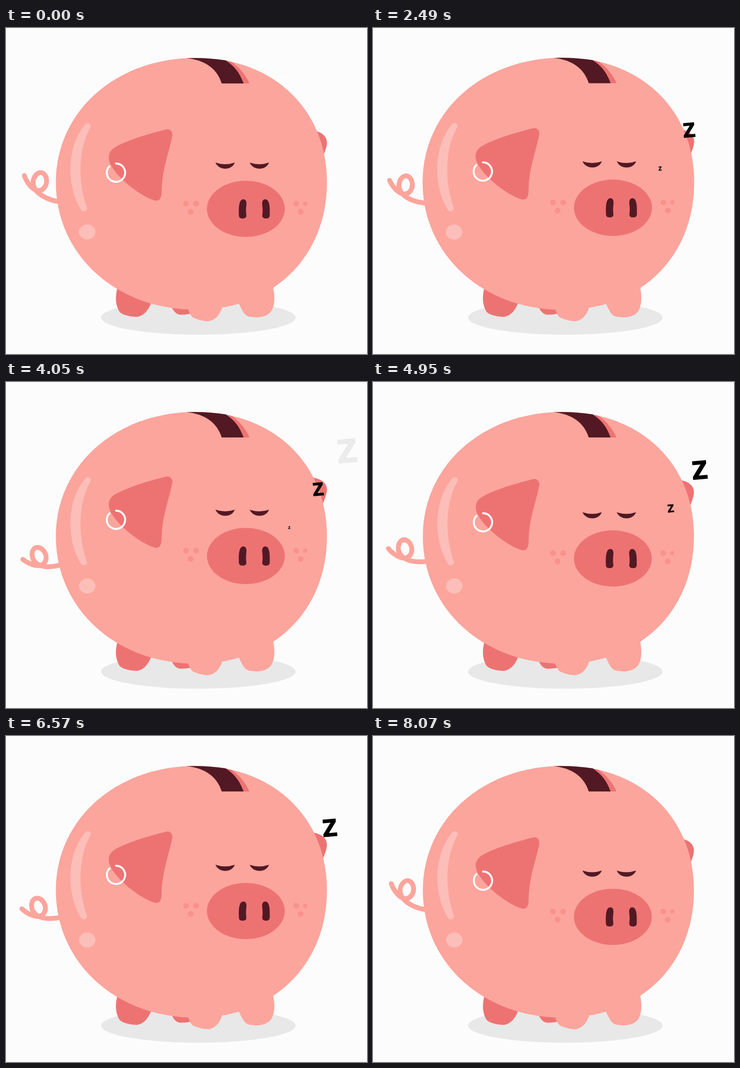
Write an HTML page that moves like this. It is 748 by 676 pixels and loops after 8.1 s.

```html
<!DOCTYPE html>
<html lang="en">
<head>
<meta charset="utf-8">
<title>Sleeping piggy bank</title>
<style>
  html, body { margin: 0; width: 100%; height: 100%; overflow: hidden; background: #fcfcfc; }
  svg { display: block; }
  .skin { fill: #fca59c; }
  .rose { fill: #ed7373; }
  .dark { fill: #521924; }
  .shine { fill: #fcbeb9; }
  .freckle { fill: #f9928c; }
  .line { fill: none; stroke-linecap: round; }
  .snore { font: 700 92px "Open Sans", "Noto Sans", sans-serif; text-anchor: middle; }
</style>
</head>
<body>
<svg width="748" height="676" viewBox="0 0 748 676">
  <ellipse cx="398.5" cy="600.5" rx="201.5" ry="35.5" fill="#e8e8e8"/>
  <g class="rose">
    <path d="M234 530C226 550 225 571 235 588C241 596 262 599 270 599C286 598 298 582 302 565V530Z"/>
    <path d="M338 570C346 584 350 593 360 594.5C370 595 380 593 390 591V570Z"/>
  </g>

  <g id="pig">
    <path id="tail" class="line" stroke="#fca59c" stroke-width="10"
      d="M38 306C42 318 54 337 67 337C79 337 85 325 84 315C83 304 76 299 70 300C60 302 54 316 57 326C60 342 85 358 116 361"/>
    <path class="rose head" d="M610 211C640 210 664 216 665 237C665 249 658 262 650 285Z"/>
    <path class="skin" d="M103.3 320C103.3 173 227 62 394 62C553 62 665 168 665 320C665 475 553 584 394 584C227 584 103.3 470 103.3 320Z"/>

    <path class="dark" d="M373 62.5C414 66 438 86 447 115H492.5C484 92 473 78 455 67Q415 61 373 62.5Z"/>
    <path class="rose" d="M455 67C473 78 484 92 492.5 115H504.5C497 98 485 83 468 70.5Z"/>
    <path class="shine" d="M165 199C170 195 178 199 175 206C150 250 148 315 167 371C170 378 162 383 156 378C124 327 125 245 165 199Z"/>
    <ellipse class="shine" cx="168.3" cy="423" rx="17" ry="15.7"/>

    <g class="head">
      <path class="rose" d="M331 210.5C340 208 346 215 344.5 224C338 258 324 290 322.5 335C323 354 318 362 303 356C275 345 240 318 222 292C208 272 210 256 228 246C258 230 295 220 331 210.5Z"/>
      <path class="line" stroke="#fff" stroke-width="4" d="M228 281A19 19 0 1 1 214.5 286.5"/>
      <g class="freckle">
        <circle cx="373" cy="364" r="6"/><circle cx="394" cy="364" r="6"/><circle cx="382.5" cy="381" r="6"/>
        <circle cx="601.5" cy="364" r="6"/><circle cx="620" cy="364" r="4.5"/><circle cx="610.5" cy="381" r="6"/>
      </g>
      <ellipse class="rose" cx="497" cy="375" rx="80.7" ry="58.3"/>
      <g class="dark">
        <path id="eye" d="M434 279Q454 286 474 279C468 296 441 296 434 279Z"/>
        <use href="#eye" x="71"/>
        <path id="nostril" d="M490 355.5C497 354 499 360 498 368C497 376 497 382 498 388C498.5 394 494 395 490 395C484 395 482 392 482.5 385C482 372 483 357 490 355.5Z"/>
        <use href="#nostril" transform="matrix(-1 0 0 1 1029 0)"/>
      </g>
    </g>
  </g>

  <g class="skin">
    <path d="M375 578C379 586 381 595 387 600C395 604 408 608 418 608C434 607 445 593 449 575V560H375Z"/>
    <path d="M481 568C487 580 491 591 498 596C505 600 514 600 520 600C531 599.5 542 597 549 588C557 576 558 556 553 536L500 545Z"/>
  </g>
  <g id="snores"></g>
</svg>
<script>
const LOOP = 8100, CYCLE = 2700, RISE = 1840, DRIFT = 4100;
const $ = id => document.getElementById(id);
const heads = document.querySelectorAll('.head');

const snores = [0, 1800, 3600].map(start => {
  const el = document.createElementNS('http://www.w3.org/2000/svg', 'text');
  el.textContent = 'z';
  el.setAttribute('class', 'snore');
  el.setAttribute('y', 25);
  $('snores').append(el);
  return { el, start };
});

const ease = u => (1 - Math.cos(Math.PI * u)) / 2;

// Slow inhale, then an exhale twice as fast
function breath(t) {
  const c = t % CYCLE;
  return c < RISE ? ease(c / RISE) : ease((CYCLE - c) / (CYCLE - RISE));
}

function draw(t) {
  const b = breath(t);
  // Only the first breath swells the body
  const swell = t < CYCLE ? 1 + 0.0135 * b : 1;
  $('pig').setAttribute('transform', `translate(384 322) scale(${swell}) translate(-384 -322)`);
  $('tail').setAttribute('transform', `rotate(${-38.8 * b} 142.5 342.5)`);
  heads.forEach(h => h.setAttribute('transform', `translate(0 ${-17 * b})`));

  for (const { el, start } of snores) {
    const p = (t - start) / DRIFT;
    const shown = p > 0 && p < 1;
    el.style.display = shown ? '' : 'none';
    if (!shown) continue;
    el.setAttribute('transform', `translate(${572 + 136.5 * p} ${322 - 181.5 * p}) rotate(-5) scale(${p})`);
    el.setAttribute('opacity', Math.min(1, (1 - p) / 0.19));
  }
}

const begin = performance.now();
function tick() {
  draw((performance.now() - begin) % LOOP);
  requestAnimationFrame(tick);
}
tick();
</script>
</body>
</html>
```
